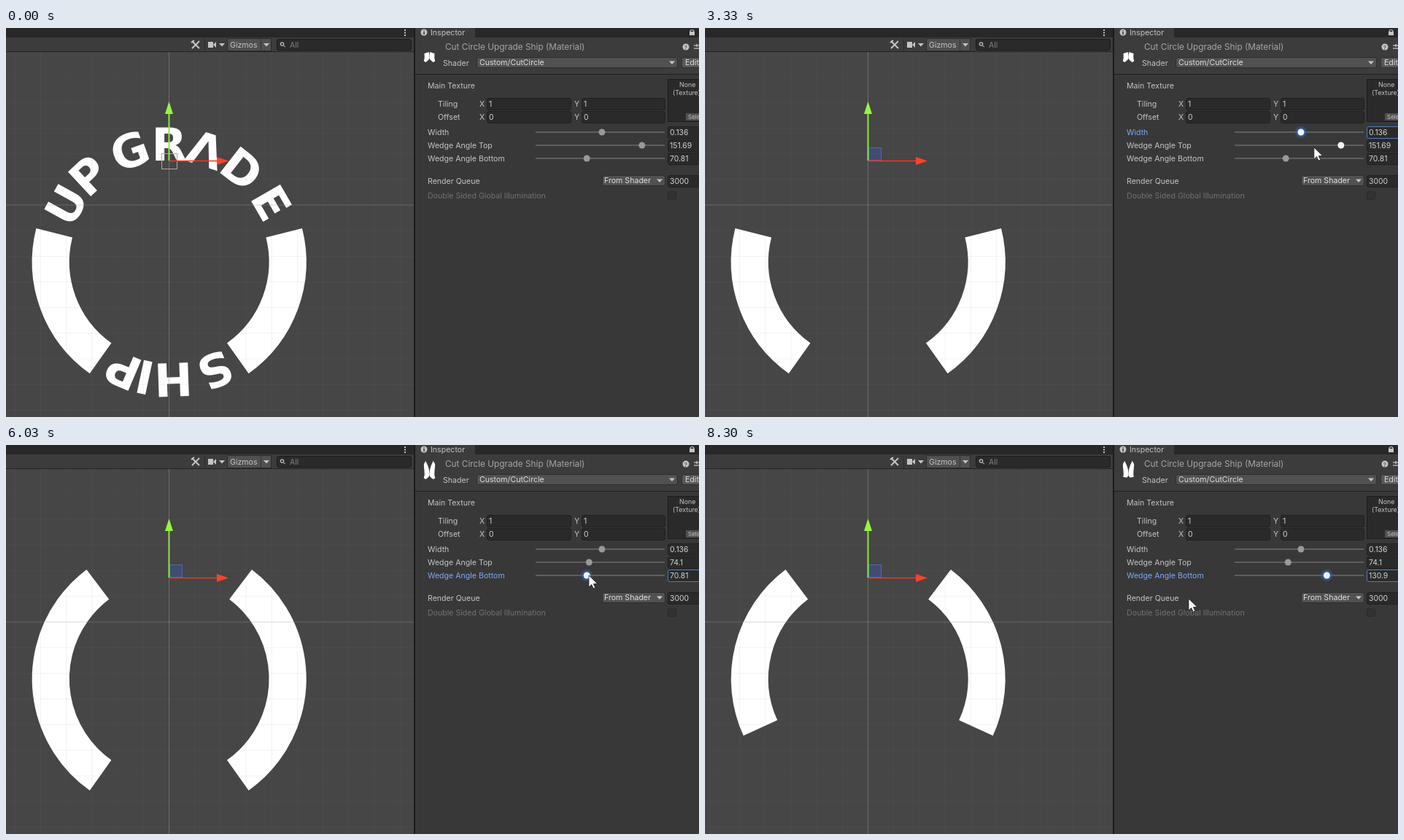
Animation of 950x534 px, one loop 8.33 s. Source, as an HTML page with a canvas:

```html
<!DOCTYPE html>
<html lang="en">
<head>
<meta charset="utf-8">
<style>
html, body { margin: 0; width: 100%; height: 100%; overflow: hidden; background: #383838; }
canvas { display: block; }
</style>
</head>
<body>
<canvas id="stage" width="950" height="534"></canvas>
<script>
const c = document.getElementById('stage').getContext('2d');
const LOOP = 8330, CX = 223.7, CY = 321, R = 188, RAD = Math.PI / 180;
const LABEL = '#c4c4c4', BLUE = '#7ba9f7';

// Dragged values: [time, value], eased between neighbours.
const widthKeys = [[30, .136], [770, .02], [930, .02], [1270, .199], [1740, .02], [2250, .22], [2640, .037], [3100, .136]];
const topKeys = [[3560, 151.69], [4200, 168], [4640, 17.1], [5180, 131], [5650, 74.1]];
const bottomKeys = [[6060, 70.81], [6400, 134], [7050, 9.68], [7700, 137], [7900, 130.9]];
const cursorY = [[0, 146], [3190, 146], [3330, 165], [3560, 162], [5750, 162], [6000, 180], [7930, 181], [8300, 212]];

function ease(keys, t) {
  const i = keys.findIndex(k => k[0] > t);
  if (i === 0) return keys[0][1];
  if (i < 0) return keys[keys.length - 1][1];
  const [t0, a] = keys[i - 1], [t1, b] = keys[i];
  const u = (t - t0) / (t1 - t0);
  return a + (b - a) * u * u * (3 - 2 * u);
}

const widthX = v => 781.3 + v * 262;
const angleX = v => 730 + v * .935;

function rect(x, y, w, h, fill, line) {
  c.fillStyle = fill;
  c.fillRect(x, y, w, h);
  if (line) {
    c.strokeStyle = line;
    c.lineWidth = 1;
    c.strokeRect(x + .5, y + .5, w - 1, h - 1);
  }
}

function box(x, y, w, h, fill, line) {
  c.beginPath();
  c.roundRect(x + .5, y + .5, w - 1, h - 1, 2.5);
  c.fillStyle = fill;
  c.fill();
  c.strokeStyle = line;
  c.lineWidth = 1;
  c.stroke();
}

function text(s, x, y, color = LABEL, size = 10.6) {
  c.font = size + 'px Inter, "Liberation Sans", sans-serif';
  c.fillStyle = color;
  c.fillText(s, x, y + 4);
}

function poly(points, fill) {
  c.beginPath();
  points.forEach(p => c.lineTo(...p));
  c.closePath();
  c.fillStyle = fill;
  c.fill();
}

function line(x0, y0, x1, y1, color, w = 1) {
  c.beginPath();
  c.moveTo(x0, y0);
  c.lineTo(x1, y1);
  c.strokeStyle = color;
  c.lineWidth = w;
  c.stroke();
}

function dot(x, y, r, fill) {
  c.beginPath();
  c.arc(x, y, r, 0, 7);
  c.fillStyle = fill;
  c.fill();
}

const arrow = (x, y) => poly([[x - 4, y - 2], [x + 4, y - 2], [x, y + 2.5]], '#c4c4c4');
const field = (x, y, w, s, active) => {
  box(x, y, w, 17, '#2a2a2a', active ? '#4a7abf' : '#202020');
  text(s, x + 3, y + 8, '#d2d2d2', 10.4);
};

function ring(w, top, bottom) {
  const thick = w * 2 * R;
  c.strokeStyle = '#fff';
  c.lineWidth = thick;
  const a = (top / 2 - 90) * RAD, b = (90 - bottom / 2) * RAD;
  c.beginPath();
  c.arc(CX, CY, R - thick / 2, a, b);
  c.stroke();
  c.beginPath();
  c.arc(CX, CY, R - thick / 2, Math.PI - b, Math.PI - a);
  c.stroke();
}

function title() {
  c.font = '700 63px "DejaVu Sans", Inter, sans-serif';
  c.fillStyle = '#fff';
  c.textAlign = 'center';
  const letters = 'UPGRΛDESHIP';
  [-61, -43, -19.5, 0, 18, 38, 60, 157, 178, 192, 203].forEach((angle, i) => {
    c.save();
    c.translate(CX, CY);
    c.rotate(angle * RAD);
    c.fillText(letters[i], 0, -139);
    c.restore();
  });
  c.textAlign = 'left';
}

function gizmo(start) {
  if (start) rect(213, 172, 22, 22, 'transparent', '#aaa');
  else rect(224, 164, 18, 18, 'rgba(58,88,190,.35)', '#4a68c0');
  line(223.5, 182, 223.5, 116, '#8fe840', 2);
  poly([[218, 118], [223.5, 101], [229, 118]], '#93f83f');
  line(224, 182.5, 290, 182.5, '#e53a26', 1.4);
  poly([[289, 177], [305, 182.5], [289, 188]], '#f5452c');
}

function scene(t, w, top, bottom) {
  rect(0, 0, 560, 534, '#464646');
  ring(w, top, bottom);
  if (t < 30) title();
  for (let i = -8; i < 10; i++) {
    const x = 223.5 + i * 35.2, y = 243 + i * 35.2;
    if (i) line(x, 33, x, 534, 'rgba(128,128,128,.1)');
    if (i) line(0, y, 560, y, 'rgba(128,128,128,.1)');
  }
  line(223.5, 33, 223.5, 534, 'rgba(150,150,150,.5)');
  line(0, 243, 560, 243, 'rgba(150,150,150,.4)');
  gizmo(t < 30);

  rect(0, 0, 560, 13, '#282828');
  rect(0, 13, 560, 20, '#3c3c3c');
  rect(0, 32, 560, 1, '#232323');
  [2, 5.5, 9].forEach(y => rect(546, y, 2, 2, '#c4c4c4'));
  line(255, 28, 265, 18, LABEL, 2);
  line(255, 18, 265, 28, LABEL, 2);
  line(254, 20, 258, 17, LABEL, 2);
  rect(272, 14, 1, 18, '#2c2c2c');
  rect(277, 19, 7, 8, LABEL);
  poly([[284, 23], [288, 19], [288, 27]], LABEL);
  arrow(296, 23);
  rect(303, 14, 61, 18, '#505050', '#2c2c2c');
  text('Gizmos', 307, 23);
  rect(349, 14, 1, 18, '#333');
  arrow(357, 23);
  box(371, 15, 185, 16, '#2a2a2a', '#1c1c1c');
  c.beginPath();
  c.arc(378.5, 22, 2.2, 0, 7);
  c.strokeStyle = LABEL;
  c.lineWidth = 1.2;
  c.stroke();
  line(380, 24, 383, 26, LABEL);
  text('All', 389, 23, '#808080', 10.4);
}

// Material preview: the ring wrapped round a small sphere, seam in front.
function preview(w, top, bottom) {
  const a0 = top / 2 * RAD, a1 = Math.PI - bottom / 2 * RAD;
  for (const side of [-1, 1]) {
    const points = [];
    const add = (r, k) => {
      const a = a0 + (a1 - a0) * k / 16;
      const lat = -Math.PI * r * Math.cos(a), v = Math.sin(lat);
      const x = 9 * Math.sqrt(Math.cos(lat)) * Math.sin(2 * Math.PI * (.5 - r * Math.sin(a)));
      points.push([580.5 + side * x, 40.5 + v * (v < 0 ? 20 : 7)]);
    };
    for (let k = 0; k <= 16; k++) add(.5, k);
    for (let k = 16; k >= 0; k--) add(.5 - w, k);
    poly(points, '#fff');
  }
}

function slider(name, y, x, value, active, hover) {
  text(name, 578, y, active ? BLUE : LABEL);
  rect(726, y - 1, 177, 2, '#5e5e5e');
  if (active) {
    dot(x, y, 8.5, 'rgba(45,90,160,.45)');
    dot(x, y, 6.5, 'rgba(55,105,190,.5)');
  }
  dot(x, y, 4.5, active || hover ? '#f0f4fa' : '#999');
  field(907, y - 8, 50, value, active);
}

function inspector(t, w, top, bottom, active) {
  rect(559, 0, 391, 534, '#383838');
  rect(559, 0, 391, 13, '#282828');
  rect(561, 0, 82, 14, '#3c3c3c');
  rect(561, 13, 389, 50, '#3c3c3c');
  rect(561, 63, 389, 1, '#202020');
  rect(559, 0, 2, 534, '#1b1b1b');
  dot(573, 6, 4.5, LABEL);
  rect(572.3, 5, 1.5, 4, '#333');
  rect(572.3, 3, 1.5, 1.2, '#333');
  text('Inspector', 582, 6);
  rect(937, 5, 7, 5, LABEL);
  c.beginPath();
  c.arc(940.5, 5, 2.5, Math.PI, 0);
  c.strokeStyle = LABEL;
  c.lineWidth = 1.2;
  c.stroke();

  preview(w, top, bottom);
  text('Cut Circle Upgrade Ship (Material)', 602, 26, '#a5a5a5', 11.8);
  dot(932, 26, 4.5, LABEL);
  text('?', 929.7, 25.5, '#333', 8);
  line(943, 24, 950, 24, LABEL, 1.3);
  line(943, 28, 950, 28, LABEL, 1.3);
  line(947, 22, 947, 26, LABEL, 1.3);
  text('Shader', 599, 48);
  box(645, 40, 276, 15, '#515151', '#2d2d2d');
  text('Custom/CutCircle', 649, 47, '#e0e0e0');
  arrow(913, 47.5);
  box(926, 40, 40, 15, '#585858', '#2d2d2d');
  text('Edit', 931, 47, '#e0e0e0');

  text('Main Texture', 578, 79);
  rect(907, 70, 50, 59, '#2a2a2a', '#1c1c1c');
  text('None', 923, 77, LABEL, 8.9);
  text('(Texture)', 914, 88, LABEL, 8.9);
  rect(932, 117, 30, 10, '#515151');
  text('Select', 935, 121, LABEL, 8);
  [['Tiling', 104, '1'], ['Offset', 122, '0']].forEach(([name, y, v]) => {
    text(name, 592, y);
    text('X', 649, y);
    field(659, y - 8, 116, v);
    text('Y', 779, y);
    field(789, y - 8, 115, v);
  });

  const degrees = (v, keys) => String(t < keys[0][0] ? v : +v.toFixed(1));
  slider('Width', 143, widthX(w), String(+w.toFixed(3)), active === 0);
  slider('Wedge Angle Top', 161, angleX(top), degrees(top, topKeys), active === 1, t > 3280 && t < 3560);
  slider('Wedge Angle Bottom', 179, angleX(bottom), degrees(bottom, bottomKeys), active === 2);

  text('Render Queue', 578, 210);
  box(817, 202, 87, 15, '#515151', '#2d2d2d');
  text('From Shader', 820, 209, '#e0e0e0');
  arrow(896, 209.5);
  field(907, 202, 50, '3000');
  text('Double Sided Global Illumination', 578, 230, '#717171');
  box(907, 224, 12, 12, '#323232', '#2b2b2b');
}

function cursorX(t, w, top, bottom) {
  if (t < 3190) return widthX(w);
  if (t < 3560) return ease([[3190, 817], [3560, 872]], t);
  if (t < 5700) return angleX(ease(topKeys, t + 33)) + 1;
  if (t < 6060) return ease([[5700, 800], [5980, 799]], t);
  if (t < 7930) return angleX(bottom) + 2;
  return ease([[7930, 854], [8300, 663]], t);
}

function cursor(x, y) {
  const tip = [[0, 0], [0, 16], [3.7, 12.6], [6.2, 18], [8.8, 16.8], [6.4, 11.7], [11.5, 11.2]];
  poly(tip.map(p => [p[0] + x, p[1] + y - 1]), '#fff');
  c.strokeStyle = '#222';
  c.lineWidth = .8;
  c.stroke();
}

function draw(now) {
  const t = now % LOOP;
  const w = ease(widthKeys, t), top = ease(topKeys, t), bottom = ease(bottomKeys, t);
  const active = t < 30 ? -1 : t < 3560 ? 0 : t < 6000 ? 1 : 2;
  scene(t, w, top, bottom);
  inspector(t, w, top, bottom, active);
  if (t >= 30) cursor(cursorX(t, w, top, bottom), ease(cursorY, t));
}

const start = performance.now();
function tick() {
  draw(performance.now() - start);
  requestAnimationFrame(tick);
}
tick();
</script>
</body>
</html>
```
